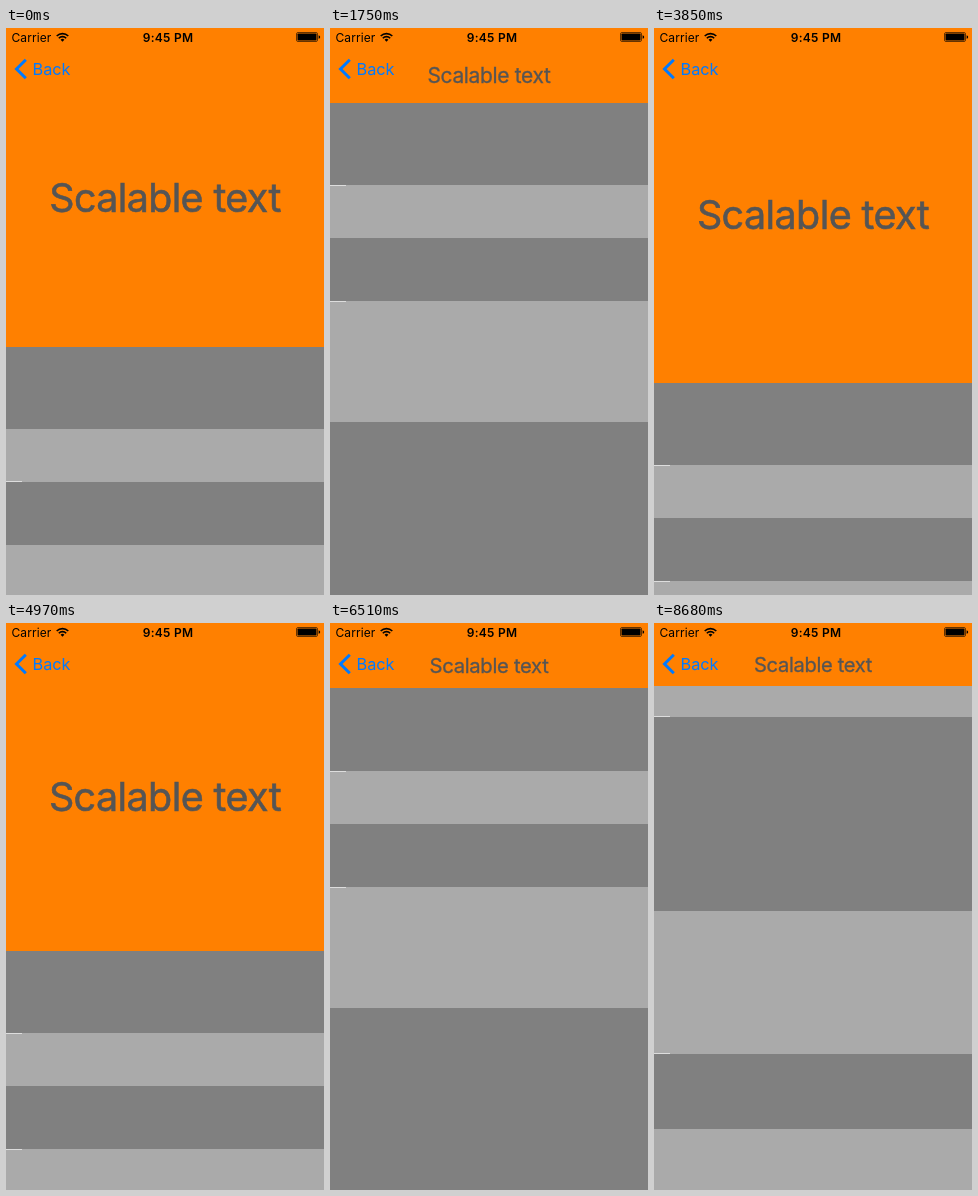
An HTML page that plays this animation: 318x567 px, repeating every 9940 ms.

```html
<!DOCTYPE html>
<html lang="en">
<head>
<meta charset="utf-8">
<title>Scalable header</title>
<style>
  html, body { margin: 0; width: 100%; height: 100%; overflow: hidden; background: #ff8000; }
  svg { display: block; width: 318px; height: 567px; }
  text { font-family: Inter, "Open Sans", sans-serif; font-optical-sizing: none; }
</style>
</head>
<body>
<svg viewBox="0 0 318 567">
  <g id="list" shape-rendering="crispEdges"></g>
  <rect id="header" width="318" fill="#ff8000" shape-rendering="crispEdges"/>
  <g id="title">
    <text y="14.8" font-size="39.5" letter-spacing="-.6" text-anchor="middle" fill="#555" stroke="#555" stroke-width=".6">Scalable text</text>
  </g>
  <g fill="#007aff">
    <path d="M19.8 31.7L10.5 41l9.3 9.3" fill="none" stroke="#007aff" stroke-width="3"/>
    <text x="26.5" y="47" font-size="16.3">Back</text>
  </g>
  <g font-size="12">
    <text x="5.5" y="13.6" letter-spacing=".1">Carrier</text>
    <text x="162" y="13.6" font-weight="600" letter-spacing=".25" text-anchor="middle">9:45 PM</text>
  </g>
  <g fill="none" stroke="#000" stroke-width="1.6">
    <path d="M50.7 8a8.2 8.2 0 0 1 11.6 0M52.8 10.2a5.2 5.2 0 0 1 7.4 0"/>
    <path d="M56.5 13.8l-1.9-2a2.7 2.7 0 0 1 3.8 0z" fill="#000" stroke="none"/>
  </g>
  <rect x="290.5" y="4.5" width="21" height="9" rx="1.5" fill="none" stroke="#000" stroke-opacity=".6"/>
  <rect x="291.5" y="5.5" width="19" height="7" rx=".8"/>
  <path d="M312.6 7.2q1.6.4 1.6 1.8t-1.6 1.8z"/>
</svg>
<script>
const LOOP = 9940, STEP = 70, BAR = 63;
const REST = 318.7, PEAK = 387;

// Row edges below the top of the list
const edges = [0, 82.5, 135.5, 198.5, 319.5, 513.5, 656.5, 731.5];

// Finger drags: time and top of the list
const drags = [
  [0, REST], [700, REST], [1190, 229.7], [1890, 61.3], [2590, 60.8], [2800, 100.2],
  [3850, 354.2], [4550, PEAK], [5460, REST], [5950, 209.2], [6510, 65],
  [7140, -144.3], [7560, -190.7]
];

// Critically damped spring back to rest
function bounce(t) {
  const u = Math.max(0, t - 4690) * 0.013;
  return REST + (PEAK - REST) * (1 + u) * Math.exp(-u);
}

// Slowing scroll after a flick, cut off when it gets slow
const glide = t => -230.3 + 86 * Math.exp(-(Math.min(t, 8680) - 7140) / 541);

const slope = i => (drags[i + 1][1] - drags[i][1]) / (drags[i + 1][0] - drags[i][0]);

// Harmonic mean keeps the curve monotone between points
function tangent(i) {
  if (i === 0) return 0;
  const a = slope(i - 1), b = slope(i);
  return a * b > 0 ? 2 * a * b / (a + b) : 0;
}

function drag(t) {
  const i = drags.findIndex(p => t < p[0]) - 1;
  const [t0, y0] = drags[i], [t1, y1] = drags[i + 1];
  const d = t1 - t0, u = (t - t0) / d, v = 1 - u;
  return v * v * ((1 + 2 * u) * y0 + u * d * tangent(i)) +
         u * u * ((1 + 2 * v) * y1 - v * d * tangent(i + 1));
}

function listTop(t) {
  if (t >= 7140) return glide(t);
  return t > 4550 && t < 5460 ? bounce(t) : drag(t);
}

const list = document.getElementById('list');
const header = document.getElementById('header');
const title = document.getElementById('title');

function addRect(width, height, fill) {
  const r = document.createElementNS('http://www.w3.org/2000/svg', 'rect');
  r.setAttribute('width', width);
  r.setAttribute('height', height);
  r.setAttribute('fill', fill);
  return list.appendChild(r);
}

const rows = edges.map((_, i) => addRect(318, 1000, i % 2 ? '#aaa' : '#808080'));
const lines = edges.slice(1).map(() => addRect(16, 1, '#ddd'));

function draw(t) {
  const top = listTop(t);
  const height = Math.max(BAR, top);
  rows.forEach((r, i) => r.setAttribute('y', Math.round(top + edges[i])));

  // The hairline gaps show or vanish with the subpixel position
  const phase = top < Math.round(top) ? 1 : 0;
  lines.forEach((l, i) => {
    l.setAttribute('y', Math.round(top + edges[i + 1]) - i % 2);
    l.setAttribute('visibility', i % 2 === phase ? 'visible' : 'hidden');
  });

  header.setAttribute('height', Math.ceil(height));
  const scale = Math.min(1, 0.5086 + (height - BAR) * 0.001912);
  title.setAttribute('transform', `translate(159 ${41 + (height - BAR) / 2}) scale(${scale})`);
}

const start = performance.now();
function frame() {
  const t = (performance.now() - start) % LOOP;
  draw(Math.floor(t / STEP) * STEP);
  requestAnimationFrame(frame);
}
frame();
</script>
</body>
</html>
```
